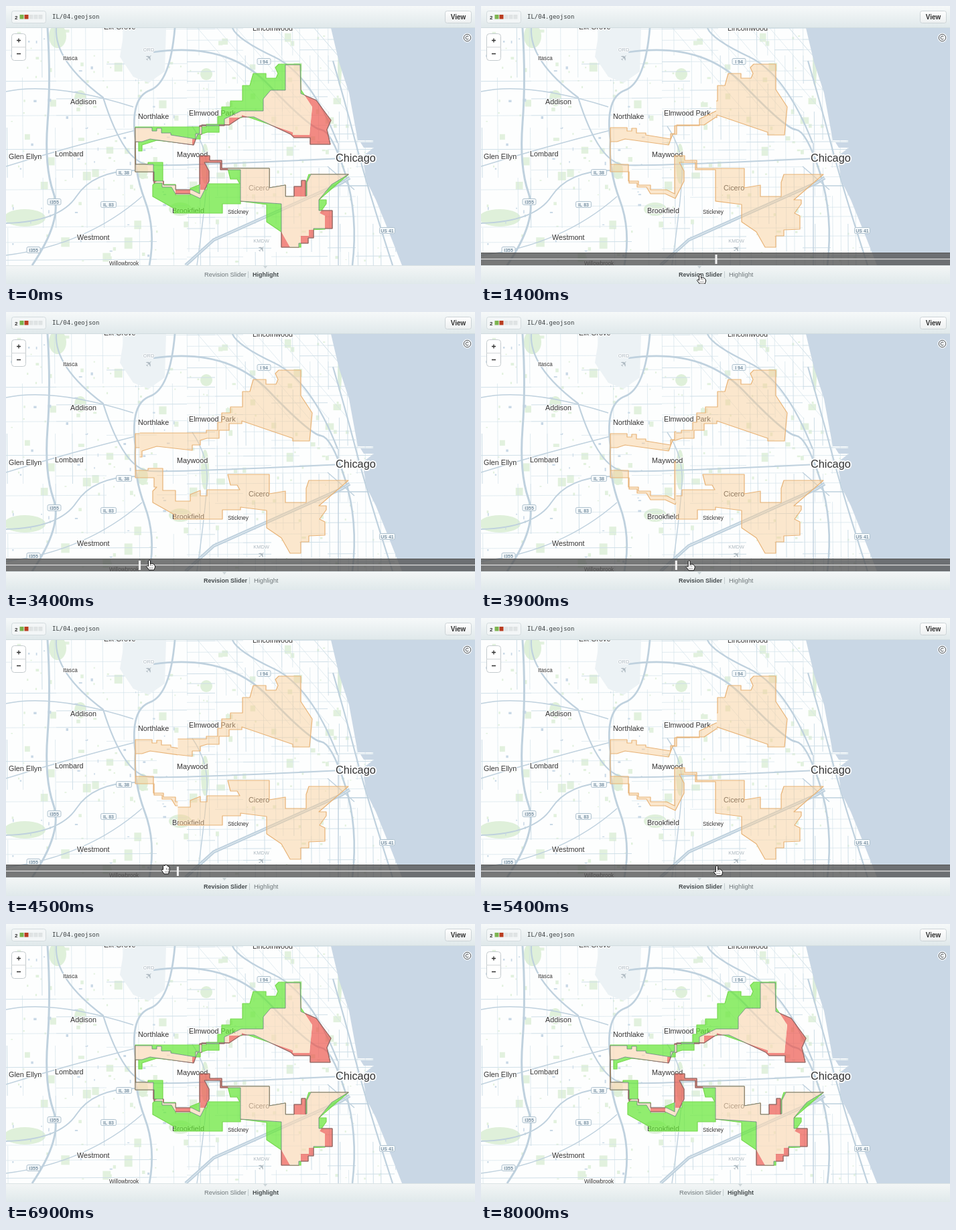
Recreate the animation shown at these times as an HTML page with a canvas. Size 700 px wide and 416 px high, loop 8.1 s.

```html
<!DOCTYPE html>
<html lang="en">
<head>
<meta charset="utf-8">
<title>Map revisions</title>
<style>
html, body { margin: 0; width: 100%; height: 100%; overflow: hidden; background: #fff; }
canvas { display: block; width: 700px; height: 416px; }
</style>
</head>
<body>
<canvas id="stage" width="700" height="416"></canvas>
<script>
const W = 700, H = 416, TOP = 32, BOTTOM = 388, LOOP = 8100;
const SANS = '"Liberation Sans", sans-serif';
const MONO = '"DejaVu Sans Mono", monospace';
const stage = document.getElementById('stage').getContext('2d');

function join(...parts) {
  const path = new Path2D('M193 203V237');
  for (const part of parts) path.addPath(new Path2D(part));
  return path;
}

// Two revisions of the same district, each with a northern and a southern lobe.
const oldArea = join(
  'M193 181H299V177H316V165H322V151H335V142H353V119H364L369 101H388V108H403L406 101L402 92L407 87H440V125' +
  'L457 151L453 193H428V189L352 163V167H333V177H318V189H300L290 192V199H278V207L225 201L203 208V217H198V203H193Z',
  'M193 237H212V234H234V267H253V283H275V273L290 267V275H300V266H349L345 259H335L331 243H393V272L417 268V285H448' +
  'V264L452 252H511L467 290H478V296L468 310L476 314V334L452 335V344H440V361H424L411 338L389 323V297L350 292V296' +
  'H323V310H251V303L219 285V268L225 262H221V248H193Z');
const newArea = join(
  'M193 182H218V187H225V183H232V190H246V193L283 199V191H289V179H326V169L351 157H384V139L395 126H417V88H439' +
  'L440 131L463 141L485 171L479 185L484 207H454V197H430L425 192L370 166H351L333 178H292V192H286L280 208L215 199L203 203H193Z',
  'M193 237H220V262H235V268H253V275H277L289 281V224H304V231H322V243H393V272L417 268V285H430V270H441V261H447V284H449' +
  'V264L455 252H511L486 267L467 290V306H487V333H459V347H451V355H437V361H411V296L350 292V245H320V234H296L303 247' +
  'V262L290 288L275 281H253L247 271H233V265H221V248H193Z');

function randomizer(seed) {
  return () => (seed = (seed * 16807) % 2147483647) / 2147483647;
}

function fillPath(c, d, color) {
  c.fillStyle = color;
  c.fill(new Path2D(d));
}

function strokePath(c, d, color, width) {
  c.strokeStyle = color;
  c.lineWidth = width;
  c.stroke(new Path2D(d));
}

function text(c, str, x, y, size, { color = '#333', weight = '', family = SANS, align = 'left', halo = 0 } = {}) {
  c.font = `${weight} ${size}px ${family}`;
  c.textAlign = align;
  if (halo) {
    c.strokeStyle = 'rgba(255,255,255,.85)';
    c.lineWidth = halo;
    c.strokeText(str, x, y);
  }
  c.fillStyle = color;
  c.fillText(str, x, y);
}

function box(c, x, y, w, h, r, fill, stroke) {
  c.beginPath();
  c.roundRect(x + .5, y + .5, w - 1, h - 1, r);
  c.fillStyle = fill;
  c.fill();
  c.strokeStyle = stroke;
  c.lineWidth = 1;
  c.stroke();
}

function shade(c, y0, y1, from, to) {
  const g = c.createLinearGradient(0, y0, 0, y1);
  g.addColorStop(0, from);
  g.addColorStop(1, to);
  return g;
}

function parks(c, random) {
  c.fillStyle = '#e2f1de';
  for (let i = 0; i < 190; i++) {
    const size = 2 + random() ** 3 * 11;
    c.fillRect(random() * 560, 33 + random() * 350, size, size * (.5 + random()));
  }
  const blob = (x, y, rx, ry) => {
    c.beginPath();
    c.ellipse(x, y, rx, ry, 0, 0, 7);
    c.fill();
  };
  c.fillStyle = '#dff0da';
  blob(28, 317, 31, 13);
  blob(77, 45, 13, 18);
  blob(204, 246, 8, 13);
  blob(299, 102, 9, 9);
  blob(297, 236, 6, 30);
  blob(260, 304, 17, 10);
  blob(111, 138, 9, 12);
  blob(498, 92, 3, 28);
  c.fillStyle = '#c8d8e6';
  for (let i = 0; i < 45; i++) c.fillRect(random() * 250, 40 + random() * 340, 1 + random() * 4, 1 + random() * 4);
}

function streets(c, random) {
  c.strokeStyle = '#cfdfe8';
  const street = (x0, y0, x1, y1) => {
    c.lineWidth = random() < .3 ? 1 : .6;
    c.beginPath();
    c.moveTo(x0, y0);
    c.lineTo(x1, y1);
    c.stroke();
  };
  const grid = (x0, x1, step, keep) => {
    const span = step * 3, gap = () => step * (.75 + random() * .5);
    for (let x = x0; x < x1; x += gap()) {
      for (let y = TOP; y < BOTTOM; y += span) {
        if (random() < keep) street(x + y * .008, y, x + (y + span) * .008, y + span);
      }
    }
    for (let y = 36; y < BOTTOM; y += gap()) {
      for (let x = x0; x < x1; x += span) {
        const end = Math.min(x + span, x1);
        if (random() < keep) street(x, y - x * .006, end, y - end * .006);
      }
    }
  };
  grid(0, 270, 25, .62);
  grid(270, 580, 14, .77);
  for (let x = 285; x < 500; x += 29) street(x, TOP, x + 110, 160);
}

function highways(c) {
  const road = (d, width, color = '#bfd1de') => strokePath(c, d, color, width);
  road('M62 33Q67 110 62 175T71 280T39 388', 3);
  road('M75 33Q72 82 145 137Q176 236 215 238T500 228', 2.2);
  road('M252 33Q245 115 215 126T193 200Q190 245 207 290T214 388', 2.8);
  road('M220 69Q330 53 392 118T470 185T506 250T517 388', 2.6);
  road('M338 33Q345 50 400 76T495 205', 2.2);
  road('M0 325Q80 323 105 285T193 246', 2);
  road('M488 82Q505 140 522 205T577 388', 2.2);
  road('M0 128Q70 113 190 151M0 240Q90 212 193 186M0 373Q120 358 203 285', 1.5);
  road('M278 180Q302 215 300 255T285 388', 1.4);
  const diagonal = 'M268 388L310 350L500 265L513 257';
  road(diagonal, 5);
  road(diagonal, 1, '#eaf1f5');
  road('M496 205V388M487 269H542M480 240L520 275', 1.4);
}

function airport(c, code, x, y) {
  text(c, code, x, y, 7.5, { color: '#abb7bf', align: 'center', halo: 2 });
  c.save();
  c.translate(x, y + 9);
  c.rotate(-Math.PI / 4);
  text(c, '✈', 0, 5, 13, { color: '#aab6be', family: '"DejaVu Sans", sans-serif', align: 'center' });
  c.restore();
}

function shield(c, label, x, y) {
  const w = label.length * 3 + 9;
  box(c, x - w / 2, y - 5, w, 10, 2, '#f5f9fb', '#afc2cf');
  text(c, label, x, y + 2.7, 7, { color: '#7890a2', weight: 'bold', align: 'center' });
}

function drawMap() {
  const canvas = document.createElement('canvas');
  canvas.width = W;
  canvas.height = H;
  const c = canvas.getContext('2d'), random = randomizer(4177);
  c.lineJoin = 'round';
  c.fillStyle = '#fdfefe';
  c.fillRect(0, 0, W, H);
  parks(c, random);
  streets(c, random);
  fillPath(c, 'M177 33L170 76L190 106L213 115L237 98L239 33Z', '#ecf2f5');
  highways(c);
  fillPath(c, 'M485 33L497 84L512 130L525 201H548V204H529L534 212H549L532 225L538 262L552 290L573 342L591 388H700V33Z', '#c9d7e5');

  airport(c, 'ORD', 213, 68);
  airport(c, 'KMDW', 381, 354);
  shield(c, 'I 94', 385, 83);
  shield(c, 'IL 38', 176, 249);
  shield(c, 'IL 83', 153, 297);
  shield(c, 'I355', 72, 293);
  shield(c, 'I355', 41, 365);
  shield(c, 'US 41', 569, 336);

  const place = (name, x, y, size = 10.8) => text(c, name, x, y, size, { halo: size > 12 ? 4 : 2.5 });
  place('Elk Grove', 146, 35);
  place('Lincolnwood', 368, 37);
  place('Itasca', 85, 81, 8.2);
  place('Addison', 96, 147);
  place('Northlake', 197, 169);
  place('Elmwood Park', 273, 164);
  place('Glen Ellyn', 4, 229);
  place('Lombard', 73, 225);
  place('Maywood', 255, 226);
  place('Cicero', 362, 276);
  place('Brookfield', 248, 310);
  place('Stickney', 331, 311, 8.2);
  place('Westmont', 106, 350);
  place('Willowbrook', 154, 388, 8.2);
  place('Chicago', 492, 233, 16.3);
  return canvas;
}

const map = drawMap();

function area(path, fill, stroke) {
  stage.fillStyle = fill;
  stage.fill(path);
  stage.strokeStyle = stroke;
  stage.lineWidth = 1.2;
  stage.stroke(path);
}

function masked(draw, mask, inverse) {
  const clip = new Path2D();
  if (inverse) clip.rect(0, 0, W, H);
  clip.addPath(mask);
  stage.save();
  stage.clip(clip, 'evenodd');
  draw();
  stage.restore();
}

function drawDifference() {
  masked(() => area(oldArea, 'rgba(105,232,58,.72)', '#77d94f'), newArea, true);
  masked(() => area(newArea, 'rgba(237,82,72,.67)', '#d9544c'), oldArea, true);
  masked(() => {
    stage.fillStyle = 'rgba(251,218,181,.66)';
    stage.fill(oldArea);
  }, newArea, false);
  stage.strokeStyle = 'rgba(92,126,124,.75)';
  stage.lineWidth = 1;
  stage.stroke(newArea);
}

function drawSwipe(x) {
  const side = (left, right, path) => {
    const half = new Path2D();
    half.rect(left, TOP, right - left, BOTTOM - TOP);
    masked(() => area(path, 'rgba(249,205,150,.47)', '#e8b377'), half, false);
  };
  side(0, x, newArea);
  side(x, W, oldArea);
}

function drawSlider(x) {
  stage.fillStyle = 'rgba(82,82,82,.78)';
  stage.fillRect(0, 369, W, 19);
  stage.fillStyle = '#555';
  stage.fillRect(0, 369, W, 1);
  stage.fillStyle = '#d9d9d9';
  stage.fillRect(0, 378, W, 1.3);
  stage.fillStyle = '#f4f4f4';
  stage.fillRect(x - 1.5, 372, 3, 14);
}

function drawControls() {
  box(stage, 8, 41, 22, 41, 4, '#fff', '#c4cbce');
  strokePath(stage, 'M8 61.5H30', '#d2d6d8', 1);
  strokePath(stage, 'M16 51.5H22M19 48.5V54.5M16 71.5H22', '#333', 1.3);
  const arc = (r, from, to) => {
    stage.beginPath();
    stage.arc(688.5, 47.5, r, from, to);
  };
  arc(7, 0, 7);
  stage.fillStyle = 'rgba(255,255,255,.75)';
  stage.fill();
  stage.strokeStyle = '#4d5254';
  stage.lineWidth = 1;
  arc(5.2, 0, 7);
  stage.stroke();
  arc(2.4, .75, 5.5);
  stage.stroke();
}

function drawHeader() {
  stage.fillStyle = shade(stage, 0, TOP, '#f6f9f9', '#e0e9eb');
  stage.fillRect(0, 0, W, TOP);
  stage.fillStyle = '#d1dcdf';
  stage.fillRect(0, TOP, W, 1);
  box(stage, 8, 7, 52, 19, 3, '#f3f6f7', '#d3dbde');
  text(stage, '2', 13, 20, 8, { weight: 'bold' });
  ['#7cb450', '#b93c20', '#dfe3e4', '#dfe3e4', '#dfe3e4'].forEach((color, i) => {
    stage.fillStyle = color;
    stage.fillRect(20.5 + i * 7, 13, 6, 6.5);
  });
  text(stage, 'IL/04.geojson', 69, 19, 9, { family: MONO, color: '#3c4042' });
  box(stage, 655, 7, 40, 19, 3, shade(stage, 7, 26, '#fff', '#eceff0'), '#ccd3d6');
  text(stage, 'View', 675, 20, 10, { weight: 'bold', align: 'center' });
}

function drawFooter(sliderMode) {
  stage.fillStyle = shade(stage, BOTTOM, H, '#f3f6f6', '#e0e9eb');
  stage.fillRect(0, BOTTOM, W, H - BOTTOM);
  stage.fillStyle = '#dbe3e5';
  stage.fillRect(0, BOTTOM, W, 1);
  const mark = sliderMode ? 326 : 387;
  fillPath(stage, `M${mark - 3} 389h6l-3 4z`, '#ccd5d8');
  const tab = (label, x, active) => text(stage, label, x, 405, active ? 9 : 9.4,
    { weight: active ? 'bold' : '', color: active ? '#454b4d' : '#6f777a' });
  tab('Revision Slider', sliderMode ? 295 : 296, sliderMode);
  tab('Highlight', sliderMode ? 370 : 368, !sliderMode);
  stage.fillStyle = '#c4cdd0';
  stage.fillRect(sliderMode ? 363 : 361, 397, 1, 10);
}

const pointer = new Path2D('M-1.5 1Q0-1 1.5 1V6Q6 4 8.5 9V11L7 15H-.5L-4.6 9.6Q-4.6 7.5-1.5 9.4Z');
const palm = new Path2D('M-3.5 3Q-2.2 1-1 3Q.2-1 1.5 2Q2.8.7 4 4Q5.5 3 6 5V10L4.5 15H-2L-5.8 9.5Q-5.8 7.3-3.5 8.6Z');

function drawCursor([x, y]) {
  stage.save();
  stage.translate(x, y);
  const shape = y < 369 ? palm : pointer;
  stage.fillStyle = '#fff';
  stage.fill(shape);
  stage.strokeStyle = '#151515';
  stage.lineWidth = 1;
  stage.stroke(shape);
  strokePath(stage, 'M1.5 6V9M4 7V9.5M0 11V13M2.2 11V13M4.4 11V13', '#333', .6);
  stage.restore();
}

// Time, x, y
const journey = [
  [1000, 330, 418], [1200, 327, 401], [1400, 327, 401], [2200, 351, 376], [2600, 351, 376],
  [3200, 185, 373], [3400, 214, 371], [4000, 330, 372], [4500, 238, 368], [4800, 200, 370], [5200, 352, 370],
  [5600, 352, 371], [6100, 383, 402], [6600, 383, 402], [6900, 410, 418]
];

function cursorAt(t) {
  const next = journey.findIndex(key => key[0] > t);
  if (next < 1) return null;
  const [t0, x0, y0] = journey[next - 1], [t1, x1, y1] = journey[next];
  const k = (t - t0) / (t1 - t0);
  return [x0 + (x1 - x0) * k, y0 + (y1 - y0) * k];
}

function sliderAt(t) {
  return cursorAt(Math.min(Math.max(t - 100, 2500), 5300))[0];
}

function render(now) {
  const t = Math.floor(now % LOOP / 100) * 100;
  const sliderMode = t >= 1300 && t < 6300;
  stage.lineJoin = 'round';
  stage.drawImage(map, 0, 0);
  if (sliderMode) {
    drawSwipe(sliderAt(t));
    drawSlider(sliderAt(t));
  } else if (t < 1300 || t >= 6500) {
    drawDifference();
  }
  drawControls();
  drawHeader();
  drawFooter(sliderMode);
  const cursor = cursorAt(t);
  if (cursor) drawCursor(cursor);
}

const start = performance.now();
function tick() {
  render(performance.now() - start);
  requestAnimationFrame(tick);
}
tick();
</script>
</body>
</html>
```
